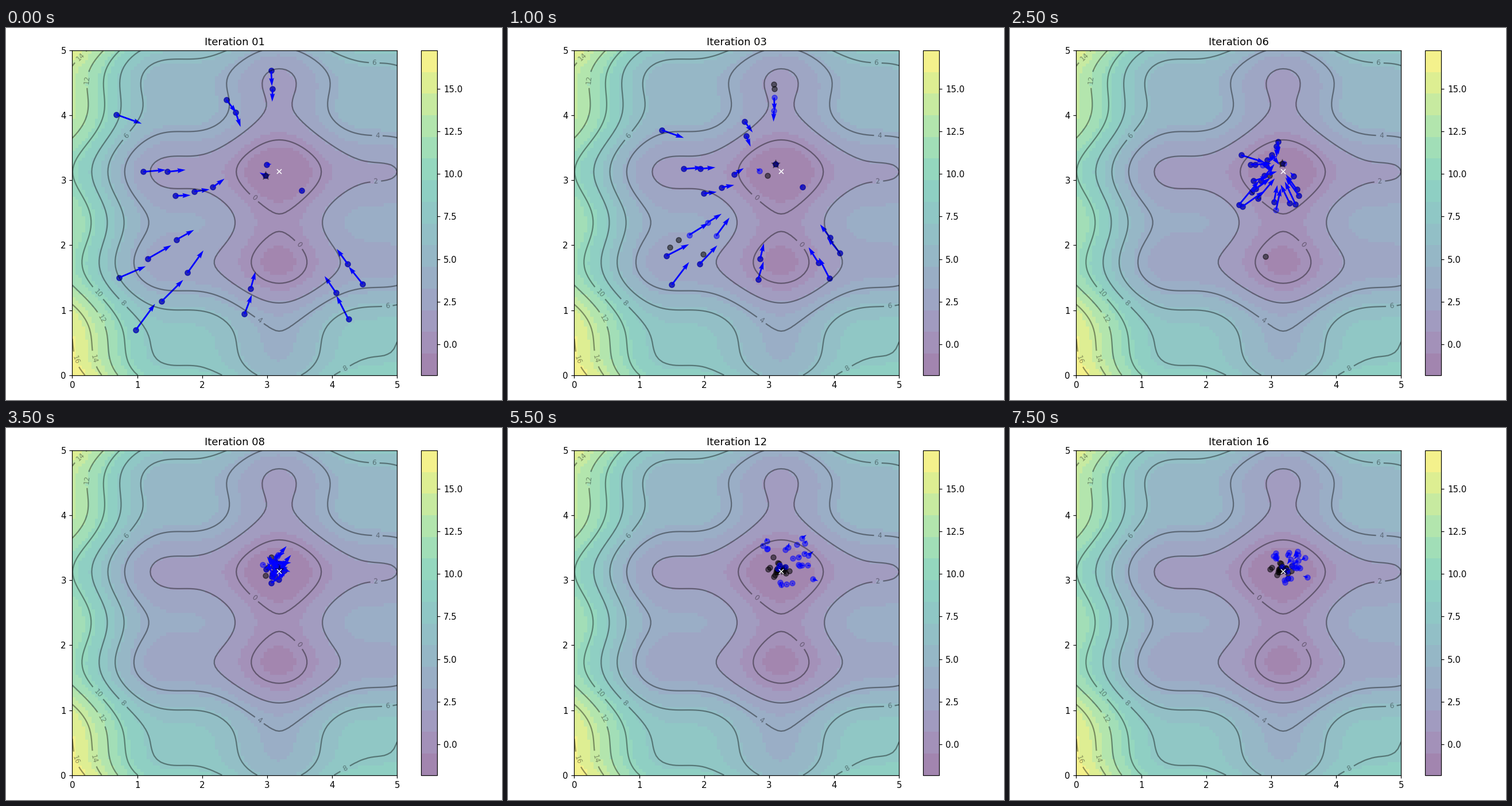
Write a matplotlib script that moves like this. It is 864 by 648 pixels and loops after 8000 ms.

```python
import numpy as np
import matplotlib.pyplot as plt
from matplotlib.animation import FuncAnimation
from matplotlib.colors import ListedColormap

N_ITER = 16
INERTIA = 0.8
OWN_PULL = 0.03
SPEED = 0.16    # first step, as a share of the way to the optimum
SPACING = 0.18  # gap between followers, as a share of that way

# Leaders of files of particles, by file length
LEADERS = {
    3: [(0.72, 1.50), (0.98, 0.70), (1.59, 2.76)],
    2: [(1.09, 3.13), (2.37, 4.24), (3.06, 4.69),
        (2.65, 0.94), (4.25, 0.86), (4.47, 1.40)],
    1: [(0.68, 4.01), (3.53, 2.84), (2.99, 3.24), (2.97, 3.07)],
}


def f(x, y):
    """Objective function."""
    return ((x - 3.14)**2 + (y - 2.72)**2
            + np.sin(3 * x + 1.41) + np.sin(4 * y - 1.73))


def social_pull(i):
    """Pull towards the best particle, rising and falling every 5 steps."""
    return 0.045 + 0.035 * np.cos(2 * np.pi * (i - 4.5) / 5)


def start_positions(goal):
    points = []
    for size, leaders in LEADERS.items():
        for lead in np.array(leaders):
            points += [lead + SPACING * k * (goal - lead) for k in range(size)]
    return np.array(points).T


def run_swarm(goal):
    """All states as (X, V, pbest, gbest)."""
    rng = np.random.default_rng(1)
    X = start_positions(goal)
    V = SPEED * (goal[:, None] - X) + rng.normal(0, 0.045, X.shape)
    pbest, best = X.copy(), f(*X)
    gbest = pbest[:, [best.argmin()]]
    states = [(X, V, pbest.copy(), gbest)]
    for i in range(2, N_ITER + 1):
        V = (INERTIA * V + OWN_PULL * (pbest - X)
             + social_pull(i) * (gbest - X))
        X = X + V
        obj = f(*X)
        better = obj <= best
        pbest[:, better] = X[:, better]
        best = np.minimum(best, obj)
        gbest = pbest[:, [best.argmin()]]
        states.append((X, V, pbest.copy(), gbest))
    return states


axis = np.linspace(0, 5, 100)
x, y = np.meshgrid(axis, axis)
z = f(x, y)
optimum = np.array([x.flat[z.argmin()], y.flat[z.argmin()]])

states = run_swarm(optimum)
X, V, pbest, gbest = states[0]

bands = 15
cmap = ListedColormap(plt.get_cmap("viridis")((np.arange(bands) + 0.5) / bands))

fig, ax = plt.subplots(figsize=(8, 6), dpi=108)
img = ax.imshow(z, extent=[0, 5, 0, 5], origin="lower", cmap=cmap, alpha=0.5)
bar = fig.colorbar(img, ax=ax)
ax.plot(*optimum, marker="x", markersize=5, color="white")
contours = ax.contour(x, y, z, 10, colors="black", alpha=0.4)
ax.clabel(contours, inline=True, fontsize=8, fmt="%.0f")

# Fixed layout in pixels
side, bottom = 566, 43.2
ax.set_position([115.48 / 864, bottom / 648, side / 864, side / 648])
bar.ax.set_position([723.06 / 864, bottom / 648, side / 20 / 864, side / 648])

pbest_plot = ax.scatter(*pbest, marker="o", color="black", alpha=0.5)
p_plot = ax.scatter(*X, marker="o", color="blue", alpha=0.5)
p_arrow = ax.quiver(*X, *V, color="blue", width=0.005,
                    angles="xy", scale_units="xy", scale=1)
gbest_plot = ax.scatter(*gbest, marker="*", s=100, color="black", alpha=0.4)
ax.set_xlim(0, 5)
ax.set_ylim(0, 5)


def animate(i):
    X, V, pbest, gbest = states[i]
    ax.set_title(f"Iteration {i + 1:02d}")
    pbest_plot.set_offsets(pbest.T)
    p_plot.set_offsets(X.T)
    p_arrow.set_offsets(X.T)
    # angles="xy" takes its base points from XY
    p_arrow.XY = X.T
    p_arrow.set_UVC(*V)
    gbest_plot.set_offsets(gbest.T)
    return pbest_plot, p_plot, p_arrow, gbest_plot


anim = FuncAnimation(fig, animate, frames=N_ITER, interval=500,
                     repeat=True, repeat_delay=0, blit=False)
plt.show()
```
